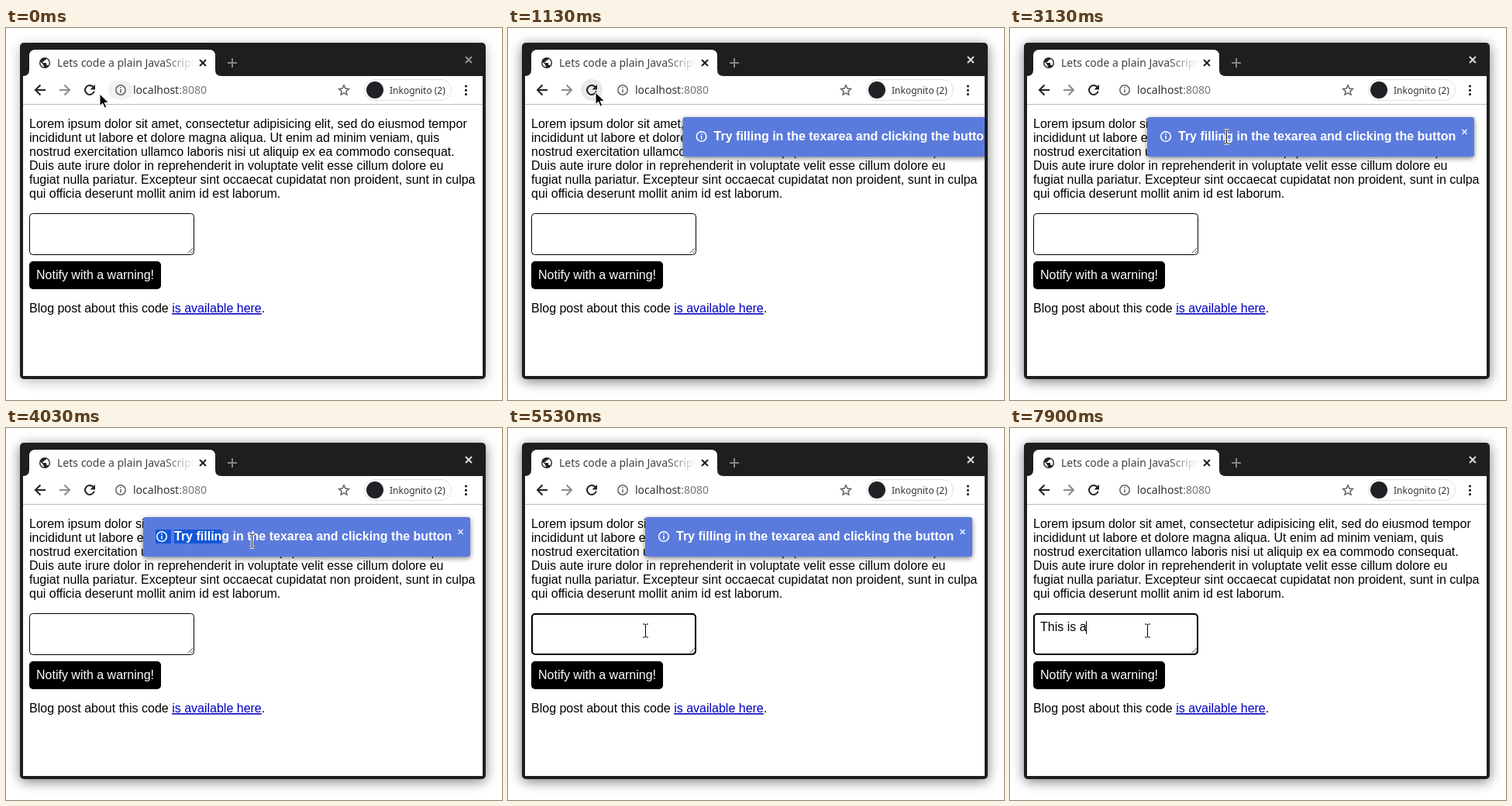
An HTML page that plays this animation: 640x480 px, repeating every 8 s.

```html
<!DOCTYPE html>
<html lang="en">
<head>
<meta charset="utf-8">
<title>Notification demo</title>
<style>
  html, body { margin: 0; width: 100%; height: 100%; overflow: hidden; background: #fff; }
  svg { display: block; }
  text { white-space: pre; font: 16px "Liberation Sans", Arial, sans-serif; }
  .ui { font: 14px "Noto Sans", sans-serif; }
  .line { fill: none; stroke-width: 2; }
  #shadow { filter: blur(8px); }
  #box { filter: drop-shadow(0 2px 3px rgba(0, 0, 0, .5)); }
  #message { font-weight: bold; fill: #fff; }
</style>
</head>
<body>
<svg width="640" height="480" viewBox="0 0 640 480">
  <defs>
    <clipPath id="page"><rect x="22" y="99" width="593" height="350"/></clipPath>
    <clipPath id="tabTitle"><rect x="64" y="30" width="178" height="30"/></clipPath>
    <linearGradient id="fade">
      <stop offset="0" stop-color="#fff" stop-opacity="0"/>
      <stop offset="1" stop-color="#fff"/>
    </linearGradient>
  </defs>

  <!-- Window frame and tab strip -->
  <rect id="shadow" x="18" y="22" width="601" height="434" rx="6"/>
  <rect x="18" y="19" width="601" height="434" rx="5" fill="#1e1e1e"/>
  <path d="M22 62q8 0 8-8V36q0-8 8-8H262q8 0 8 8V54q0 8 8 8H615V449H22z" fill="#fff"/>
  <path id="globe" transform="translate(41.6 36.6) scale(.7)" fill="#202124" fill-rule="evenodd"
    d="M12 2a10 10 0 1 0 0 20a10 10 0 1 0 0-20zM11 19.9C7 19.4 4 16 4 12q0-.9.2-1.8L9 15v1q0 2 2 2zM17.9 17.4Q17.400 16 16 16h-1v-3q0-1-1-1H8v-2h2q1 0 1-1V7h2q2 0 2-2v-.4C18 5.800 20 8.700 20 12q0 3.100-2.100 5.400z"/>
  <path id="spinner" class="line" d="M50 39a6 6 0 1 1-6 6" stroke="#5f6368"/>
  <g clip-path="url(#tabTitle)">
    <text class="ui" x="66" y="50" fill="#3c4043">Lets code a plain JavaScript</text>
    <rect x="204" y="32" width="39" height="26" fill="url(#fade)"/>
  </g>
  <path class="line" d="M250 41l8 8m0-8l-8 8" stroke="#202124"/>
  <path class="line" d="M286 45h12m-6-6v12" stroke="#858585"/>
  <path id="close" class="line" d="M593 37l8 8m0-8l-8 8"/>

  <!-- Toolbar -->
  <rect x="22" y="98" width="593" height="1" fill="#b9b9b9"/>
  <circle id="reloadHover" cx="108" cy="80" r="14" fill="#e9e9e9"/>
  <rect id="infoHover" x="132" y="68" width="32" height="24" rx="12" fill="#f1f1f1"/>
  <path class="line" d="M51 80H38m6.500-6.500L38 80l6.500 6.500" stroke="#202124"/>
  <path class="line" d="M69 80h13m-6.500-6.500L82 80l-6.500 6.500" stroke="#8c8c8c"/>
  <path class="line" d="M112.500 76a6 6 0 1 0 1.300 5.500" stroke="#202124"/>
  <path d="M115 73v6.500h-6.500z" fill="#202124"/>
  <g stroke="#5f6368" stroke-width="1.500" fill="none">
    <circle cx="148" cy="80" r="6.200"/>
    <path d="M148 79v4.500m0-7.500v1.600"/>
    <path d="M436 73.800l1.900 4.200 4.500.5-3.400 3.100.9 4.500-3.900-2.300-3.900 2.300.9-4.500-3.400-3.100 4.500-.5z"/>
  </g>
  <text class="ui" x="164" y="85" fill="#303236">localhost<tspan fill="#75787c">:8080</tspan></text>
  <rect x="462.500" y="66.500" width="112" height="27" rx="13.500" fill="#fff" stroke="#dfe1e5"/>
  <circle cx="476" cy="80" r="11" fill="#202124"/>
  <text class="ui" x="495" y="85" fill="#303236" style="font-size:12px">Inkognito (2)</text>
  <path d="M593.500 75v0m0 5.300v0m0 5.300v0" stroke="#202124" stroke-width="3.200" stroke-linecap="round"/>

  <!-- Page -->
  <g id="lorem"></g>
  <rect id="area" fill="#fff" stroke="#000"/>
  <path d="M234.500 290.500l6.500-6.500m-2.500 6.500l2.500-2.500" stroke="#555"/>
  <text id="typed" x="39" y="262"></text>
  <rect id="caret" y="249" width="1" height="17"/>
  <rect x="30" y="301" width="170" height="36" rx="5"/>
  <text x="39" y="324" fill="#fff">Notify with a warning!</text>
  <text x="30" y="367">Blog post about this code <tspan fill="#0000c0" text-decoration="underline">is available here</tspan>.</text>

  <!-- Notification -->
  <g clip-path="url(#page)">
    <g id="notice">
      <rect id="box" x="177" y="115" width="422" height="51" rx="3" fill="#5a7bdc"/>
      <g fill="#1257d8">
        <rect id="iconMark" x="193" y="131" width="20" height="18"/>
        <rect id="textMark" y="131" height="18"/>
      </g>
      <g fill="none" stroke="#fff" stroke-width="1.600">
        <circle cx="201" cy="140" r="6.300"/>
        <path d="M201 139v4.500m0-7.500v1.800"/>
        <path d="M583.500 131l6 6m0-6l-6 6" stroke-width="1.300"/>
      </g>
      <text id="message" x="217" y="145">Try filling in the texarea and clicking the button</text>
    </g>
  </g>

  <path id="arrow" d="M0 0V15.500l3.600-3.300 2.600 5.800 2.500-1.100-2.600-5.600H11.300z" stroke="#fff"/>
  <g id="beam" fill="none">
    <path d="M-3.500-8.500h2.500l1 1 1-1h2.500M0-7.500v15M-3.500 8.500h2.500l1-1 1 1h2.500" stroke="#fff" stroke-width="3"/>
    <path d="M-3.500-8.500h2.500l1 1 1-1h2.500M0-7.500v15M-3.500 8.500h2.500l1-1 1 1h2.500" stroke="#000"/>
  </g>
</svg>
<script>
const LOOP = 8000;
const $ = id => document.getElementById(id);
const clamp = v => Math.min(1, Math.max(0, v));
const ramp = (t, from, to) => clamp((t - from) / (to - from));
const smooth = u => u * u * (3 - 2 * u);
const easeOut = u => 1 - (1 - u) ** 1.64;
const set = (id, attrs) => {
  for (const name in attrs) $(id).setAttribute(name, attrs[name]);
};
const show = (id, on) => set(id, { visibility: on ? 'visible' : 'hidden' });

const LOREM = [
  'Lorem ipsum dolor sit amet, consectetur adipisicing elit, sed do eiusmod tempor',
  'incididunt ut labore et dolore magna aliqua. Ut enim ad minim veniam, quis',
  'nostrud exercitation ullamco laboris nisi ut aliquip ex ea commodo consequat.',
  'Duis aute irure dolor in reprehenderit in voluptate velit esse cillum dolore eu',
  'fugiat nulla pariatur. Excepteur sint occaecat cupidatat non proident, sunt in culpa',
  'qui officia deserunt mollit anim id est laborum.'
];
$('lorem').innerHTML = LOREM.map((line, i) => `<text x="30" y="${129 + 18 * i}">${line}</text>`).join('');

// Pointer stops: time, x, y
const POINTER = [
  [0, 121, 85], [100, 121, 85], [500, 114, 84], [870, 114, 84], [930, 113, 83],
  [1370, 113, 83], [1700, 149, 190], [2000, 144, 253],
  [2600, 144, 253], [2930, 278, 140], [3100, 278, 140], [3130, 279, 140],
  [3300, 279, 140], [3600, 198, 131], [3880, 353, 154], [4030, 317, 145],
  [4140, 317, 145], [4900, 150, 260], [5140, 150, 260], [5500, 177, 261], [LOOP, 177, 261]
];
const KEY_TIMES = [6330, 6600, 6700, 6870, 6970, 7430, 7570, 7700, 7830];
const PHRASE = 'This is a';
const SELECT = { start: 3330, end: 4930, anchor: 278.5 };
const FOCUS = 4930, BLINK = 600;

function pointerAt(t) {
  const i = POINTER.findIndex(stop => stop[0] > t);
  const [t0, x0, y0] = POINTER[i - 1], [t1, x1, y1] = POINTER[i];
  const u = smooth(ramp(t, t0, t1));
  return [Math.round(x0 + (x1 - x0) * u), Math.round(y0 + (y1 - y0) * u)];
}

function drawWindow(t) {
  const active = ramp(t, 130, 400);
  const grey = Math.round(145 + 75 * active);
  set('shadow', { opacity: 0.27 + 0.25 * active });
  set('close', { stroke: `rgb(${grey},${grey},${grey})` });
  set('infoHover', { opacity: 1 - ramp(t, 130, 330) });
  set('reloadHover', { opacity: ramp(t, 250, 450) - ramp(t, 1430, 1600) });
  const loading = t >= 700 && t < 730;
  show('globe', !loading);
  show('spinner', loading);
}

function drawNotice(t, pointerX) {
  const shift = 460 * (1 - easeOut(ramp(t, 840, 1230)) + easeOut(ramp(t, 7540, 7910)));
  set('notice', { transform: `translate(${shift.toFixed(1)} 0)` });
  const selecting = t >= SELECT.start && t < SELECT.end;
  const left = t > 3600 ? 193 : pointerX;
  const textLeft = Math.min(SELECT.anchor, Math.max(217, left));
  show('iconMark', selecting && left < 205);
  show('textMark', selecting);
  set('textMark', { x: textLeft, width: SELECT.anchor - textLeft });
}

function drawTextarea(t) {
  const weight = t >= FOCUS ? 2 : 1;
  set('area', {
    x: 30 + weight / 2, y: 239 + weight / 2, width: 213 - weight, height: 54 - weight,
    rx: 4, 'stroke-width': weight
  });
  const typed = $('typed');
  typed.textContent = PHRASE.slice(0, KEY_TIMES.filter(k => k <= t).length);
  set('caret', { x: Math.floor(39 + typed.getComputedTextLength()) });
  show('caret', t >= FOCUS && (t < FOCUS + BLINK || t >= FOCUS + 2 * BLINK));
}

function draw(t) {
  const [x, y] = pointerAt(t);
  const overText = y > 114;
  drawWindow(t);
  drawNotice(t, x);
  drawTextarea(t);
  show('arrow', !overText);
  show('beam', overText);
  set('arrow', { transform: `translate(${x} ${y})` });
  set('beam', { transform: `translate(${x + 0.5} ${y + 0.5})` });
}

const begin = performance.now();
function frame() {
  draw((performance.now() - begin) % LOOP);
  requestAnimationFrame(frame);
}
frame();
</script>
</body>
</html>
```
